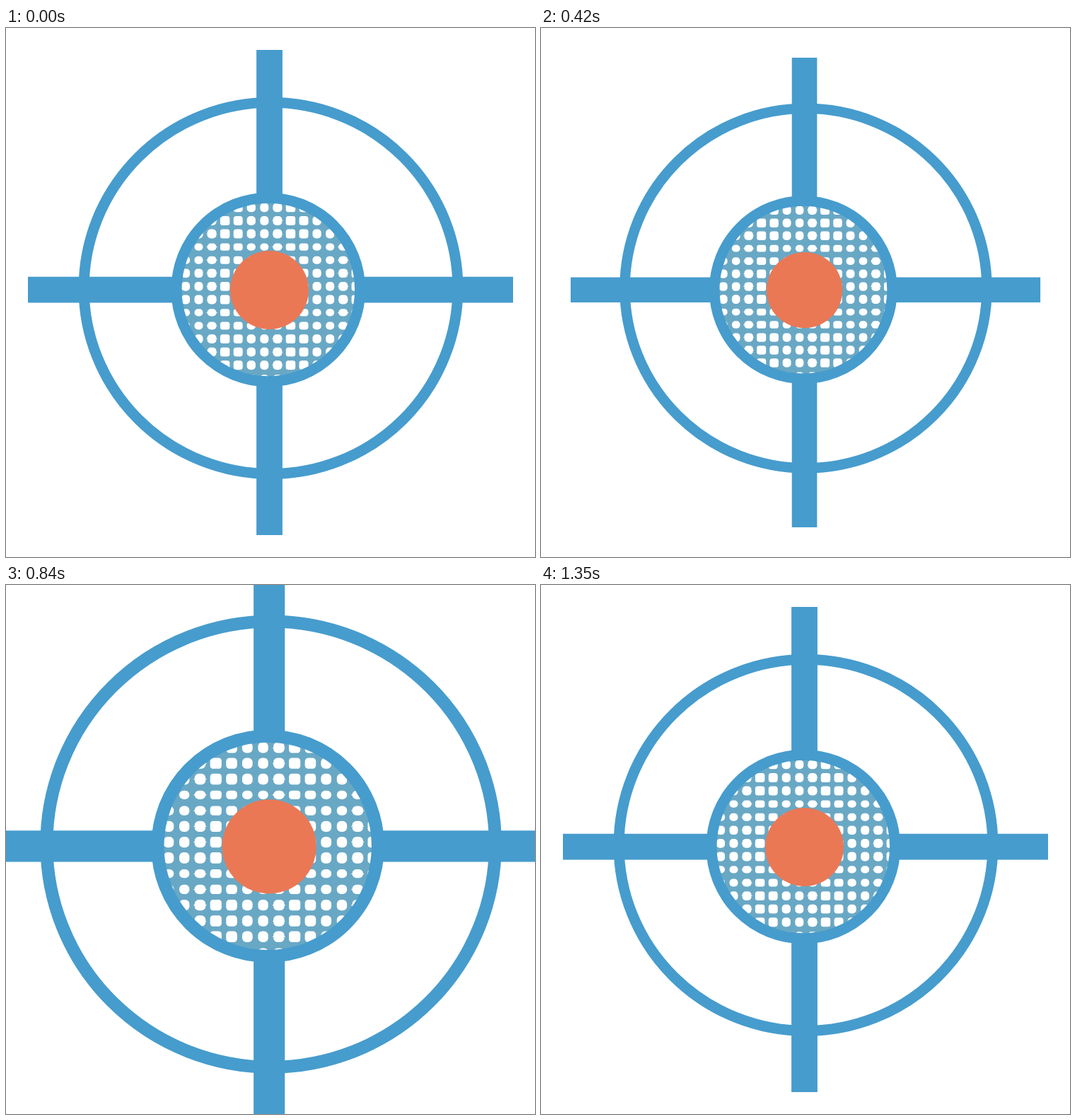
Recreate the animation shown at these times as an HTML page. Size 748x748 px, loop 1.83 s.

```html
<!DOCTYPE html>
<html lang="en">
<head>
<meta charset="utf-8">
<title>Pulsing crosshair</title>
<style>
  html, body { margin: 0; width: 100%; height: 100%; overflow: hidden; background: #fff; }
  svg { display: block; width: 100vw; height: 100vh; }
</style>
</head>
<body>
<svg viewBox="0 0 748 748">
  <clipPath id="lens"><circle cx="371" cy="370" r="124"/></clipPath>
  <g id="target">
    <g fill="none" stroke="#469ccd">
      <ellipse cx="374.5" cy="367.9" rx="264.4" ry="262.6" stroke-width="15"/>
      <path d="M372.5 31V240M372.5 500V717M31 370.1H240M500 370.1H717" stroke-width="36.8"/>
    </g>
    <circle cx="371" cy="370" r="128" fill="#69a8c4"/>
    <path id="dots" fill="#fff" clip-path="url(#lens)"/>
    <circle cx="370.8" cy="370" r="129.8" fill="none" stroke="#469ccd" stroke-width="15"/>
    <circle cx="372.5" cy="370.5" r="55.5" fill="#ea7855"/>
  </g>
</svg>
<script>
const target = document.getElementById('target');
const LOOP = 1830, STEP = 30, ACTIVE = 1350, BEAT = 675;

// Halftone dots: widths, heights and corner radii repeat every five cells.
const PITCH = 18.57;
const widths = [13, 13.5, 13, 12.3, 12];
const heights = [13, 10.2, 11, 12.7, 12.8];
const radii = [5, 3.5, 4, 5, 5];

function dot(col, row) {
  const i = (col + 10) % 5, j = (row + 10) % 5;
  const x = 383.9 + col * PITCH, y = 383.9 + row * PITCH;
  const w = widths[i], h = heights[j], r = Math.min(radii[i], h / 2);
  const corner = (dx, dy) => `a${r} ${r} 0 0 1 ${dx} ${dy}`;
  let d = `M${x - w / 2 + r} ${y - h / 2}h${w - 2 * r}${corner(r, r)}v${h - 2 * r}` +
    `${corner(-r, r)}h${2 * r - w}${corner(-r, -r)}v${2 * r - h}${corner(r, -r)}z`;
  // Small side points on one column of each group.
  if (i === 0) d += `M${x - 8} ${y}L${x} ${y - 4}L${x + 8} ${y}L${x} ${y + 4}z`;
  return d;
}

let path = '';
for (let row = -8; row <= 6; row++) {
  for (let col = -8; col <= 6; col++) path += dot(col, row);
}
document.getElementById('dots').setAttribute('d', path);

// cubic-bezier(.42, 0, .58, 1), solved by bisection.
function easeInOut(x) {
  let lo = 0, hi = 1;
  for (let i = 0; i < 24; i++) {
    const s = (lo + hi) / 2;
    if (1.26 * s - 0.78 * s * s + 0.52 * s ** 3 < x) lo = s; else hi = s;
  }
  return lo * lo * (3 - 2 * lo);
}

const keys = [[0, 1], [0.25, 1.2], [0.75, 0.932], [1, 1]];

function scaleAt(time) {
  if (time >= ACTIVE) return 1;
  const p = (time % BEAT) / BEAT;
  const k = keys.findIndex(([at]) => at > p);
  const [t0, v0] = keys[k - 1], [t1, v1] = keys[k];
  return v0 + (v1 - v0) * easeInOut((p - t0) / (t1 - t0));
}

function draw() {
  const time = Math.floor((performance.now() % LOOP) / STEP) * STEP;
  target.setAttribute('transform',
    `translate(374 374) scale(${scaleAt(time)}) translate(-374 -374)`);
  requestAnimationFrame(draw);
}
draw();
</script>
</body>
</html>
```
